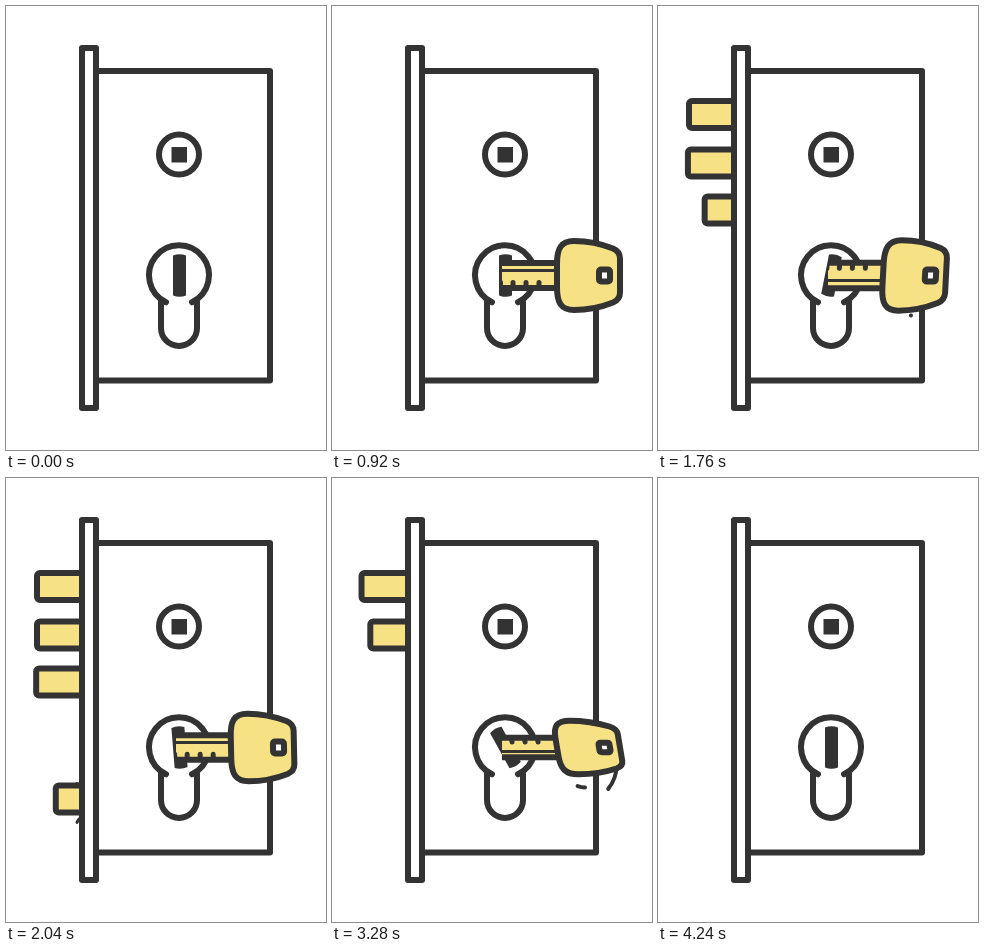
These frames come from a looping animation (320x444 px, 4.84 s). An HTML page:

```html
<!DOCTYPE html>
<html lang="en">
<head>
<meta charset="utf-8">
<title>Door lock</title>
<style>
  html, body { margin: 0; width: 100%; height: 100%; overflow: hidden; background: #fff; }
  svg { display: block; width: 320px; height: 444px; }
  .line { fill: none; stroke: #333; stroke-width: 6; stroke-linecap: round; stroke-linejoin: round; }
  .white { fill: #fff; }
  .gold { fill: #f6e184; }
  .solid { fill: #333; }
  .thin { stroke-width: 3; }
  .trail { stroke-width: 4; }
  #key * { vector-effect: non-scaling-stroke; }
</style>
</head>
<body>
<svg viewBox="0 0 320 444">
  <defs>
    <clipPath id="outside"><path d="M0 0H77V444H0Z"/></clipPath>
    <clipPath id="inSlot"><path d="M170 200H320V340H170Z"/></clipPath>
  </defs>

  <g id="bolts" clip-path="url(#outside)"></g>
  <g id="sparks" class="line thin"></g>

  <rect class="line white" x="90" y="65" width="174" height="309.5"/>
  <rect class="line white" x="76" y="42" width="14" height="360"/>

  <circle class="line" cx="173" cy="148.5" r="20"/>
  <rect class="solid" x="165.5" y="141" width="15.5" height="15.5"/>

  <path class="line" d="M160 296.3A30 30 0 1 1 186 296.3"/>
  <path class="line" d="M155 296V322A18 18 0 0 0 191 322V296"/>
  <path id="slot" class="solid" d="M-6.5 -20Q0 -22.5 6.5 -20V20Q0 22.5 -6.5 20Z"/>

  <g id="trails" class="line trail">
    <path d="M285 286C284 312 264 327 244 321"/>
    <path d="M253 309.5Q244 309 237 303"/>
  </g>

  <g clip-path="url(#inSlot)">
    <!-- drawn around the turning axis -->
    <g id="key">
      <path class="line gold" d="M225 -12.5H156L150 -6V6L156 12.5H225"/>
      <path class="line thin" d="M154 -5H225"/>
      <path class="line" style="stroke-width:5" d="M156 12V7M168.500 12V7M181 12V7M194 12V7M207 12V7"/>
      <path class="line gold" d="M225 -12C225 -27 229 -34.500 242 -34.500C256 -34.500 271 -31 281 -27Q288 -24 288 -17V17Q288 24 281 27C271 31 256 34.500 242 34.500C229 34.500 225 27 225 12Z"/>
      <rect class="line white" x="267" y="-6" width="11" height="12" rx="2"/>
    </g>
  </g>
</svg>

<script>
const LOOP = 4840, MIRROR = 4800, AXIS = 269.5;
const HIDDEN = 80, SLIDE = 400;
const $ = id => document.getElementById(id);
const clamp = v => Math.min(1, Math.max(0, v));
const span = (t, a, b) => clamp((t - a) / (b - a));
const sine = p => (1 - Math.cos(Math.PI * p)) / 2;
const backOut = p => 1 + 2.7 * (p - 1) ** 3 + 1.7 * (p - 1) ** 2;

function add(parent, tag, attrs) {
  const el = document.createElementNS("http://www.w3.org/2000/svg", tag);
  for (const name in attrs) el.setAttribute(name, attrs[name]);
  return parent.appendChild(el);
}

const bolts = [
  { y: 95, rest: 31, start: 1180 },
  { y: 143.5, rest: 31, start: 1412 },
  { y: 190.5, rest: 31, start: 1685 },
  { y: 307.5, rest: 50, start: 1890 }
];
for (const b of bolts)
  b.el = add($("bolts"), "rect", { class: "line gold", y: b.y, width: 90, height: 27, rx: 3 });

// each spark: x1, y1, x2, y2 and the times it flies on the way out and back
const sparks = [
  { path: [72, 92, 52, 81], out: 1300, back: 3540 },
  { path: [71, 86, 65, 69], out: 1300, back: 3540 },
  { path: [66, 128, 46, 135], out: 1430, back: 3300 },
  { path: [64, 140, 58, 137], out: 1430, back: 3300 },
  { path: [73, 341, 62, 359], out: 2010, back: 2800 },
  { path: [73, 307, 62, 299], out: 2010, back: 2800 }
];
for (const s of sparks) s.el = add($("sparks"), "path", {});

const trails = [...$("trails").children].map(el => ({ el, length: el.getTotalLength() }));
const sweeps = [[1240, 1480], [1760, 2000], [2780, 3020], [3240, 3480]];

function drawSpark(s, t) {
  const p = t < MIRROR / 2 ? span(t, s.out, s.out + 300) : span(t, s.back, s.back + 200);
  const head = clamp(p * 1.8), tail = clamp((p - 0.45) / 0.55);
  const [x1, y1, x2, y2] = s.path;
  const at = k => `${x1 + (x2 - x1) * k} ${y1 + (y2 - y1) * k}`;
  s.el.setAttribute("d", p > 0 && p < 1 ? `M${at(tail)}L${at(head)}` : "");
}

function drawTrails(t) {
  const sweep = sweeps.find(([a, b]) => t >= a && t < b);
  $("trails").style.display = sweep ? "" : "none";
  if (!sweep) return;
  const p = span(t, ...sweep);
  const head = clamp(p * 2.5), tail = clamp((p - 0.5) * 2);
  for (const { el, length } of trails) {
    el.style.strokeDasharray = `${(head - tail) * length} ${length * 2}`;
    el.style.strokeDashoffset = -tail * length;
  }
}

function render(t) {
  // unlocking replays the locking turn in reverse
  const m = Math.min(t, MIRROR - t);

  for (const b of bolts) {
    const out = backOut(span(m, b.start, b.start + SLIDE));
    b.el.setAttribute("x", HIDDEN + (b.rest - HIDDEN) * out);
  }
  for (const s of sparks) drawSpark(s, t);
  drawTrails(t);

  const turn = 180 * (sine(span(m, 1040, 1690)) + sine(span(m, 1700, 2080)));
  $("slot").setAttribute("transform", `translate(173.5 ${AXIS}) rotate(${turn})`);

  const rad = turn * Math.PI / 180;
  const shear = -0.27 * Math.sin(rad);
  const scale = Math.cos(rad) + 0.2 * Math.sin(rad);
  const shift = t < MIRROR / 2
    ? 170 * (1 - span(t, 160, 720)) ** 3
    : 175 * span(t, 3840, 4235) ** 2.2;
  $("key").style.display = t >= 160 && t < 4235 ? "" : "none";
  $("key").setAttribute("transform", `matrix(1 0 ${shear} ${scale} ${shift} ${AXIS})`);
}

const begin = performance.now();
function tick() {
  render((performance.now() - begin) % LOOP);
  requestAnimationFrame(tick);
}
render(0);
requestAnimationFrame(tick);
</script>
</body>
</html>
```
